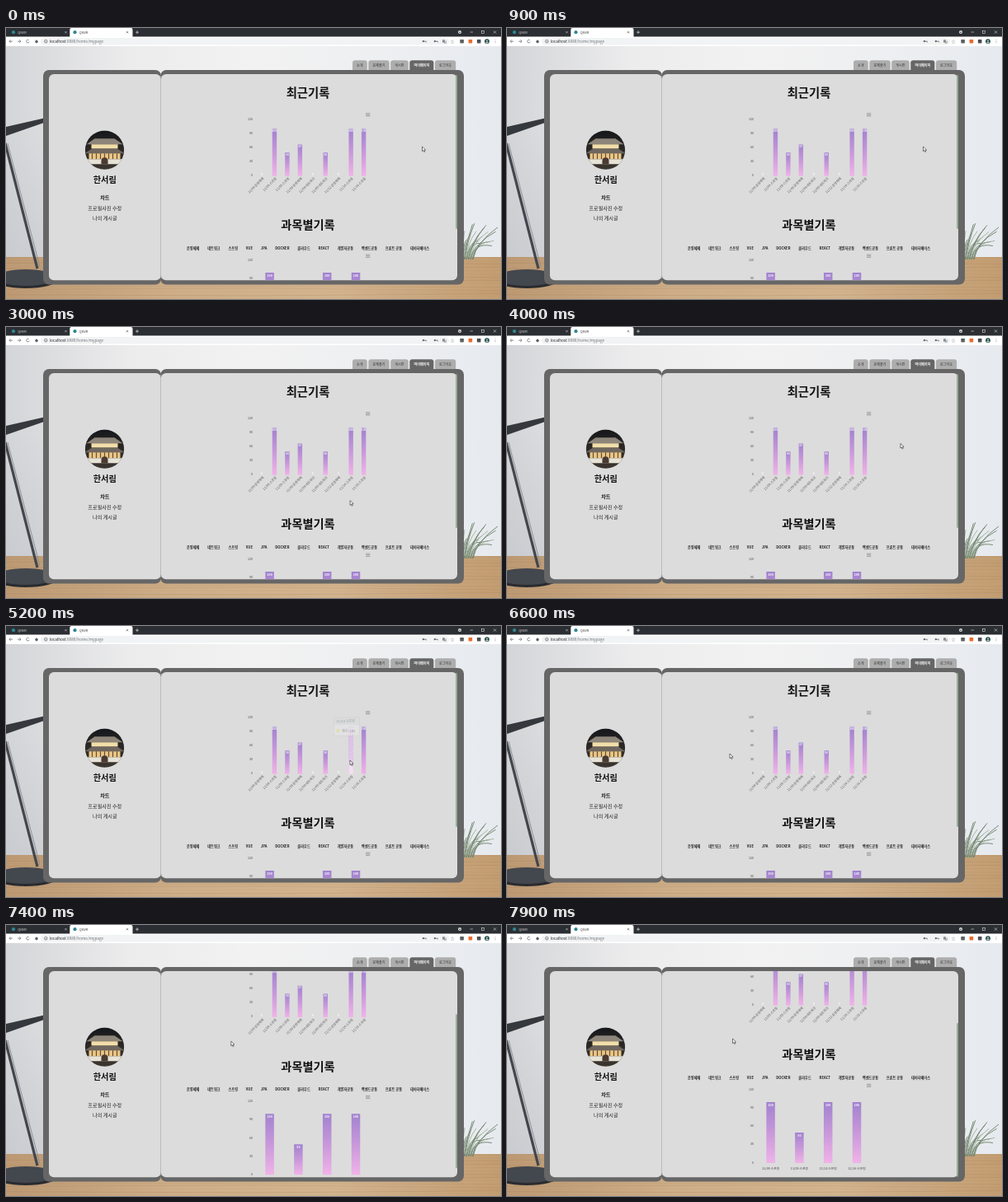
Animation of 600x329 px, one loop 8000 ms. Source, as an HTML page with a canvas:

```html
<!DOCTYPE html>
<html lang="ko">
<head>
<meta charset="utf-8">
<title>mypage</title>
<style>
html, body { margin: 0; width: 100%; height: 100%; overflow: hidden; background: #ececee; }
canvas { display: block; width: 100vw; height: 100vh; }
</style>
</head>
<body>
<canvas id="stage"></canvas>
<script>
const W = 600, H = 329, LOOP = 8000;
const FONT = '"Noto Sans CJK KR", "Noto Sans CJK", "Noto Sans", sans-serif';
const canvas = document.getElementById('stage');
const dpr = window.devicePixelRatio || 1;
canvas.width = W * dpr;
canvas.height = H * dpr;
const c = canvas.getContext('2d');
c.scale(dpr, dpr);

const clamp = v => Math.max(0, Math.min(1, v));
const ease = v => { const u = clamp(v); return u * u * (3 - 2 * u); };
const mix = (a, b, u) => a + (b - a) * u;

// the pointer circles the chart, closing in on one bar
function spiral(t) {
  const a = 0.00569 * (t - 4000);
  const r = 1 - 0.493 * clamp((t - 4000) / 1200) ** 2;
  return [371 + 106 * r * Math.cos(a), 141 + 84 * r * Math.sin(a)];
}

const CIRCLING = [3100, 5200];
const STOPS = [
  [1400, 504.5, 144], [1650, 520, 126], [2000, 502.5, 196], [2600, 452, 145],
  ...CIRCLING.map(t => [t, ...spiral(t)]),
  [6100, 265, 194], [6600, 270, 155], [7700, 273.5, 138]
];

function pointerAt(t) {
  if (t > CIRCLING[0] && t < CIRCLING[1]) return spiral(t);
  const i = STOPS.findIndex(s => s[0] > t);
  if (i < 1) return STOPS.at(i).slice(1);
  const a = STOPS[i - 1], b = STOPS[i], u = ease((t - a[0]) / (b[0] - a[0]));
  return [mix(a[1], b[1], u), mix(a[2], b[2], u)];
}

const scrollAt = t => 82 * ease((t - 6600) / 1090);

function rect(x, y, w, h, fill, r = 0) {
  c.fillStyle = fill;
  c.beginPath();
  c.roundRect(x, y, w, h, r);
  c.fill();
}

function disc(x, y, rx, fill, ry = rx) {
  c.fillStyle = fill;
  c.beginPath();
  c.ellipse(x, y, rx, ry, 0, 0, Math.PI * 2);
  c.fill();
}

function path(pts) {
  c.beginPath();
  for (let i = 0; i < pts.length; i += 2) c.lineTo(pts[i], pts[i + 1]);
}

function poly(fill, ...pts) {
  path(pts);
  c.closePath();
  c.fillStyle = fill;
  c.fill();
}

function line(stroke, width, ...pts) {
  path(pts);
  c.strokeStyle = stroke;
  c.lineWidth = width;
  c.stroke();
}

function arc(x, y, r, from = 0, to = 7) {
  c.beginPath();
  c.arc(x, y, r, from, to);
  c.stroke();
}

function setFont(size, weight = 400) {
  c.font = `${weight} ${size}px ${FONT}`;
}

function text(s, x, y, size, fill, align = 'center', weight = 400) {
  setFont(size, weight);
  c.fillStyle = fill;
  c.textAlign = align;
  c.textBaseline = 'middle';
  c.fillText(s, x, y);
}

const widthOf = s => c.measureText(s).width;

function gradient(x0, y0, x1, y1, ...colors) {
  const g = c.createLinearGradient(x0, y0, x1, y1);
  colors.forEach((col, i) => g.addColorStop(i / (colors.length - 1), col));
  return g;
}

function cross(x, y, r, col) {
  line(col, 0.6, x - r, y - r, x + r, y + r);
  line(col, 0.6, x - r, y + r, x + r, y - r);
}

function browser() {
  rect(0, 0, W, 11, '#2b2f33');
  rect(77.3, 0, 76.2, 11, '#fff', [2, 2, 0, 0]);
  [['#cfd2d5', 9], ['#444', 83.5]].forEach(([col, x]) => {
    disc(x, 5.2, 2.1, '#2f8793');
    text('QNVR', x + 5.2, 5.2, 4, col, 'left');
    cross(x + 63.5, 5.2, 1.1, col);
  });
  line('#ddd', 0.7, 157, 5.2, 161, 5.2);
  line('#ddd', 0.7, 159, 3.2, 159, 7.2);
  disc(550, 5, 2, '#e4e4e4');
  disc(550, 5.2, 0.8, '#2b2f33');
  line('#ddd', 0.6, 562.5, 5, 566, 5);
  c.strokeRect(576.6, 3.4, 3, 3);
  cross(592.5, 5, 1.6, '#ddd');

  const ink = '#5f6368', y = 16.2;
  rect(0, 10.5, W, 11.5, '#fff');
  rect(42, 12, 495, 8.5, '#f1f3f4', 4.2);
  for (const [x, s] of [[6, 1], [16, -1]]) {
    line(ink, 0.7, x - 2, y, x + 2, y);
    line(ink, 0.7, x - 0.2 * s, y - 1.8, x - 2 * s, y, x - 0.2 * s, y + 1.8);
  }
  arc(26.5, y, 1.8, 0.3, 5.4);
  poly(ink, 35, y, 37, y - 2, 39, y, 38, y + 2, 36, y + 2);
  arc(48.3, y, 1.8);
  line(ink, 0.6, 48.3, y - 0.3, 48.3, y + 1.1);
  text('localhost', 52.7, y, 4.7, '#222', 'left');
  text(':8080/home/mypage', 52.7 + widthOf('localhost'), y, 4.7, '#70757a', 'left');

  disc(505.8, y, 1.1, ink);
  line(ink, 0.8, 506, y, 509.3, y, 509.3, y + 1.2);
  disc(519.8, y, 1.1, ink);
  line(ink, 0.8, 520, y, 523.3, y, 523.3, y + 1.2);
  rect(529, y - 1.9, 3, 3.4, '#8a8e92', 0.4);
  line(ink, 0.6, 531, y + 2, 533.2, y + 2, 533.2, y - 0.7);
  text('☆', 541, 16, 5, ink);
  ['#5c5f63', '#ee6a2c', '#4a4d51'].forEach((col, i) => rect(550.3 + i * 10.3, y - 2.2, 4.6, 4.4, col, 0.6));
  disc(583, y, 2.9, '#264f4c');
  disc(583, y - 0.8, 0.9, '#c9d6d2');
  disc(583, y + 1.4, 1.7, '#c9d6d2', 0.9);
  for (let i = -1; i < 2; i++) disc(593, y + i * 1.6, 0.45, ink);
}

function room() {
  rect(0, 22, W, H - 22, gradient(0, 0, W, 0, '#d4d5d8', '#ececed', '#f2f2f2', '#eeeff1', '#e6eaef'));
  rect(0, 120, 60, 160, gradient(0, 120, 0, 280, 'rgba(180,185,193,0)', 'rgba(180,185,193,.35)'));
  rect(0, 278, W, 51, gradient(0, 278, W, 278, '#bd9a74', '#cdae88', '#d2b48f', '#c39d72'));
  for (let i = 0; i < 16; i++) {
    const y = 279 + i * 3.2, dip = Math.sin(i * 5.1) * 1.5;
    line(`rgba(140,98,58,${0.12 + 0.08 * Math.sin(i * 3.7)})`, 0.9, 0, y, W / 2, y + dip, W, y - dip);
  }
  // lamp
  poly('#35383d', 0, 120, 46, 109.5, 46, 115, 0, 131);
  line('#43464c', 3.2, -1, 140, 38, 292);
  line('#85898f', 0.9, 2, 140, 41, 290);
  disc(24, 306, 38, '#292b2f', 10);
  disc(24, 303, 37, '#43474e', 10);
  // plant
  for (let i = 0; i < 18; i++) {
    const k = i / 17, sway = Math.sin(i * 7.3);
    c.beginPath();
    c.moveTo(552 + k * 14, 281);
    c.quadraticCurveTo(554 + k * 16, 260, 556 + k * 40, 246 + sway * 12 + k * 8);
    c.strokeStyle = i % 3 ? '#6d8068' : '#a3b09c';
    c.lineWidth = 0.9;
    c.stroke();
  }
}

function frame() {
  let x = 420;
  for (const s of ['소개', '문제풀기', '게시판', '마이페이지', '로그아웃']) {
    const on = s === '마이페이지';
    setFont(4.1);
    const w = widthOf(s) + 10.2;
    rect(x, 39.3, w, 12, on ? '#666' : '#adadad', [3, 3, 0, 0]);
    text(s, x + w / 2, 45, 4.1, on ? '#fff' : '#333', 'center', on ? 700 : 400);
    x += w + 1.6;
  }
  rect(45, 51, 143, 260.5, '#666', 7);
  rect(187.3, 51, 367.7, 260.5, '#666', 7);
  rect(180, 58, 16, 246, '#8a8a8a');
  rect(52, 56, 135.6, 250.3, '#dcdcdc', 6);
  rect(188, 56, 359, 250.3, '#dcdcdc', 6);
}

function photo(x, y) {
  c.save();
  c.translate(x, y);
  c.beginPath();
  c.arc(0, 0, 23.6, 0, 7);
  c.clip();
  rect(-24, -24, 48, 48, gradient(0, -24, 0, 24, '#15171b', '#2d2926', '#3d3630'));
  poly('#8d857a', -22, -7, -12, -14, 12, -14, 22, -7);
  poly('#6f675e', -24, 4, -15, -2, 15, -2, 24, 4);
  rect(-16, -7, 32, 5, '#f1deaa');
  rect(-19, 4, 38, 7, '#e9c887');
  for (let i = -3; i <= 3; i++) rect(i * 5 - 0.6, 4, 1.2, 7, '#6a4a34');
  rect(-24, 11, 48, 6, '#e6e2d6');
  rect(-4, 9, 8, 8, '#4b3b32', [4, 4, 0, 0]);
  c.restore();
}

function profile() {
  photo(119.5, 148.2);
  text('한서림', 119.8, 184, 10.2, '#111', 'center', 700);
  ['차트', '프로필사진 수정', '나의 게시글'].forEach((s, i) =>
    text(s, 119.8, 205.9 + i * 12.6, 6.15, '#222', 'center', i ? 400 : 700));
}

function chartBase(zero, step, menuY) {
  for (let i = 0; i < 5; i++) text(i * 30, 299, zero - i * step, 3.6, '#444', 'right');
  for (let i = -1; i < 2; i++) line('#8e9297', 0.8, 436, menuY + i * 1.6, 441.3, menuY + i * 1.6);
}

function bar(x, base, w, h) {
  rect(x - w / 2, base - h, w, h, gradient(0, base - h, 0, base, '#a182cf', '#c898da', '#f0b3e8'));
}

const OS = '운영체제', SPRING = '스프링', NET = '네트워크';
const RECENT = [
  ['11/09', OS, 0], ['11/09', SPRING, 100], ['11/09', SPRING, 50], ['11/09', OS, 67], ['11/09', NET, 0],
  ['11/09', NET, 50], ['11/12', OS, 0], ['11/14', SPRING, 100], ['11/16', SPRING, 100]
];
const recentX = i => 310 + i * 15.45;

function recentChart() {
  text('최근기록', 366, 78.6, 14.3, '#111', 'center', 700);
  chartBase(178.3, 17, 105.3);
  RECENT.forEach(([day, subject, v], i) => {
    const x = recentX(i), h = v * 0.572;
    bar(x, 179.8, 5.4, h);
    text(v, x, v ? 182 - h : 178, 3.2, '#fff', 'center', 700);
    c.save();
    c.translate(x + 1.8, 182);
    c.rotate(-Math.PI / 4);
    text(day + ' ' + subject, 0, 0, 3.9, '#555', 'right');
    c.restore();
  });
}

// spread the words evenly between two edges
function spread(words, left, right, y, size) {
  setFont(size, 700);
  const widths = words.map(widthOf);
  const gap = (right - left - widths.reduce((a, b) => a + b)) / (words.length - 1);
  let x = left;
  words.forEach((s, i) => {
    text(s, x, y, size, '#222', 'left', 700);
    x += widths[i] + gap;
  });
}

function subjectChart() {
  text('과목별기록', 366, 239, 14.2, '#111', 'center', 700);
  spread([OS, NET, SPRING, 'VUE', 'JPA', 'DOCKER', '클라우드', 'REACT', '개발자공통', '백엔드공통', '프론트 공통', '데이터베이스'],
    219, 513, 267.3, 4.2);
  chartBase(370.3, 22.2, 276.8);
  RECENT.filter(r => r[1] === SPRING).forEach(([day, subject, v], i) => {
    const x = 319.6 + i * 34.8, h = v * 0.74;
    bar(x, 371, 10.5, h);
    text(v, x, 374.3 - h, 3.6, '#fff', 'center', 700);
    text(day + ' ' + subject, x, 377.3, 3.8, '#444');
  });
}

function hover(t) {
  const a = Math.min(clamp((t - 5090) / 150), clamp((5450 - t) / 150));
  if (!a) return;
  const [day, subject, v] = RECENT[7], x = recentX(7), left = x - 20.6;
  c.save();
  c.globalAlpha = a;
  c.beginPath();
  c.rect(x - 2.7, 122.6, 5.4, 57.2);
  c.clip();
  rect(x - 3, 122, 6, 58, '#f4f1f5');
  for (let y = 118; y < 164; y += 2.6) line('#c48ad8', 0.9, x - 3, y, x + 3, y + 6);
  c.restore();
  c.save();
  c.globalAlpha = a * 0.8;
  rect(left, 111, 31, 22, '#e8e8e8', 1.5);
  rect(left, 111, 31, 9, '#d5d7d9', [1.5, 1.5, 0, 0]);
  c.strokeStyle = '#c8c8c8';
  c.lineWidth = 0.5;
  c.strokeRect(left, 111, 31, 22);
  text(day + ' ' + subject, left + 3, 115.6, 4, '#777', 'left');
  disc(left + 5, 127, 1.9, '#e3d774');
  text('점수: ' + v, left + 9.7, 127, 4, '#666', 'left');
  c.restore();
}

function pointer(x, y) {
  c.save();
  c.translate(x, y);
  poly('#fff', 0, 0, 0, 5.6, 1.3, 4.5, 2.2, 6.5, 3.2, 6, 2.4, 4.1, 4.1, 4);
  c.strokeStyle = '#222';
  c.lineWidth = 0.6;
  c.stroke();
  c.restore();
}

function draw(t) {
  const scroll = scrollAt(t);
  room();
  browser();
  frame();
  profile();
  c.save();
  c.beginPath();
  c.rect(188.5, 56, 356.5, 250.3);
  c.clip();
  c.translate(0, -scroll);
  recentChart();
  subjectChart();
  hover(t);
  c.restore();
  rect(545.2, 57 + scroll * 0.755, 1.7, 187, '#8ba68b', 0.8);
  pointer(...pointerAt(t));
}

const start = performance.now();
function tick() {
  draw((performance.now() - start) % LOOP);
  requestAnimationFrame(tick);
}
tick();
</script>
</body>
</html>
```
